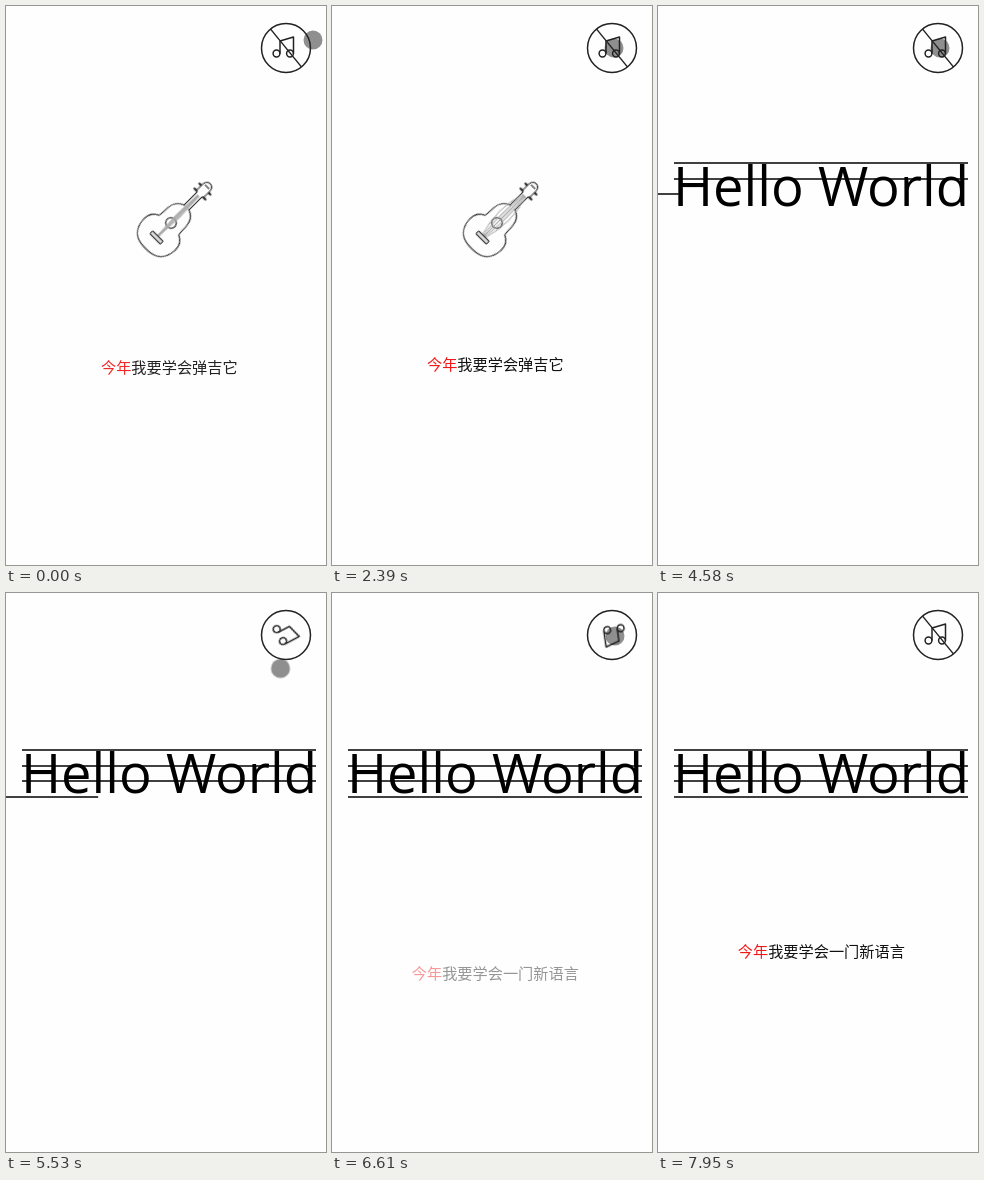
An HTML page that plays this animation: 320x559 px, repeating every 8000 ms.

```html
<!DOCTYPE html>
<html lang="zh-CN">
<head>
<meta charset="utf-8">
<title>今年计划</title>
<style>
  html, body { margin: 0; width: 100%; height: 100%; overflow: hidden; background: #fefefe; }
  svg { display: block; width: 100vw; height: 100vh; }
  svg g, svg path, svg circle, svg text { animation: 8s linear infinite both; }

  .ink { fill: none; stroke: #222; stroke-width: 1.5; stroke-linejoin: round; }
  .guitar { fill: #fefefe; stroke: #333; stroke-width: 1.2; stroke-linejoin: round; }
  .caption {
    font: 15.2px "Noto Sans CJK SC", "Noto Sans CJK JP", sans-serif;
    text-anchor: middle; fill: #111;
  }
  .caption tspan { fill: #f21818; }
  .hello { font: 54.3px "Open Sans", "Noto Sans", sans-serif; fill: #000; }

  .scene1 { animation-name: scene1 !important; }
  .scene2 { animation-name: scene2 !important; }
  .settle { animation-name: settle !important; }
  .rise { animation-name: rise !important; }
  .notes { animation-name: spin !important; transform-origin: 280px 42px; }
  .slash { animation-name: slash !important; }
  .pointer { animation-name: pointer !important; fill: #202020; fill-opacity: .5; }

  .rule {
    stroke: #000; stroke-width: 1.5;
    animation-name: slide !important;
    animation-delay: calc(var(--i) * 850ms) !important;
  }
  .strings {
    fill: none; stroke: #aaa; stroke-width: .9;
    /* 33 plucks per loop */
    animation: pluck calc(8s / 33) 75ms ease-in-out infinite both !important;
  }
  .strings path { vector-effect: non-scaling-stroke; }

  @keyframes scene1 {
    0%, 32.125% { opacity: 1; }
    32.126%, 100% { opacity: 0; }
  }
  @keyframes scene2 {
    0%, 32.125% { opacity: 0; }
    32.126%, 100% { opacity: 1; }
  }
  @keyframes settle {
    0% { transform: translateY(3px); opacity: .93; }
    .94%, 100% { transform: none; opacity: 1; }
  }
  @keyframes rise {
    0%, 76.875% { transform: translateY(40px); opacity: 0; }
    90%, 100% { transform: translateY(0); opacity: 1; }
  }
  @keyframes slide {
    0% { transform: translateX(-400px); }
    32.25% { transform: translateX(-400px); animation-timing-function: cubic-bezier(.37, 0, .63, 1); }
    42.875%, 100% { transform: translateX(0); }
  }
  @keyframes pluck {
    0%, 100% { transform: scaleY(.3); }
    50% { transform: scaleY(1); }
  }
  @keyframes spin {
    0%, 61.5% { transform: rotate(0deg); }
    85% { transform: rotate(191deg); }
    85.001%, 100% { transform: rotate(0deg); }
  }
  @keyframes slash {
    0%, 61.5% { opacity: 1; }
    61.501%, 85% { opacity: 0; }
    85.001%, 100% { opacity: 1; }
  }
  @keyframes pointer {
    0% { transform: translate(307px, 34px); }
    3.125% { transform: translate(304px, 23px); }
    7.5%, 21.875% { transform: translate(283px, 35px); }
    23.75%, 62.5% { transform: translate(282px, 42px); }
    65.625%, 73.75% { transform: translate(274.5px, 75.5px); }
    77.5%, 90% { transform: translate(283px, 43px); }
    93.625% { transform: translate(260px, 123px); }
    97.375% { transform: translate(77px, 485px); opacity: 1; }
    97.376%, 100% { transform: translate(77px, 485px); opacity: 0; }
  }
</style>
</head>
<body>
<svg viewBox="0 0 320 559" preserveAspectRatio="none">
  <g class="scene1">
    <!-- drawn along the neck, sound hole at the origin -->
    <g class="guitar" transform="translate(165 217) rotate(-45)">
      <path d="M41 -7.5V7.5M48 -7.5V7.5" stroke-width="2.4" stroke-linecap="round"/>
      <path d="M21 -3.5H40L42 -5H50Q55.500 -4.500 55.500 0T50 5H42L40 3.500H21Z"/>
      <path d="M22 -3.500C20 -9 15 -12.500 9 -13C3 -13.500 1 -13 -3 -14
               C-6 -21 -12 -22.500 -18 -22C-28 -21 -34 -16 -35.500 -7Q-36.500 0 -35.500 7
               C-34 16 -28 21 -18 22C-12 22.500 -6 21 -3 14C1 13 3 13.500 9 13C15 12.500 20 9 22 3.500Z"/>
      <path d="M6 -2.500H39V2.500H6Z" fill="#e2e2e2" stroke="none"/>
      <circle r="5.300"/>
      <g class="strings">
        <path d="M-19 -2Q10 -11 39 -2"/>
        <path d="M-19 -1Q10 -5 39 -1"/>
        <path d="M-19 0H39"/>
        <path d="M-19 1Q10 5 39 1"/>
        <path d="M-19 2Q10 11 39 2"/>
      </g>
      <rect x="-22.500" y="-7.500" width="4" height="15" rx="1" fill="#ddd"/>
      <path d="M51 -3V3"/>
    </g>
    <text class="caption settle" x="163.300" y="364"><tspan>今年</tspan>我要学会弹吉它</text>
  </g>

  <g class="scene2">
    <text class="hello" x="15" y="199.500">Hello World</text>
    <path class="rule" style="--i:0" d="M16 157H310"/>
    <path class="rule" style="--i:1" d="M16 173H310"/>
    <path class="rule" style="--i:2" d="M16 188H310"/>
    <path class="rule" style="--i:3" d="M16 204H310"/>
    <text class="caption rise" x="163.300" y="364"><tspan>今年</tspan>我要学会一门新语言</text>
  </g>

  <g class="ink">
    <circle cx="280" cy="42" r="24.500"/>
    <path class="slash" d="M264.500 23L295.500 61" stroke-width="1.200"/>
    <g class="notes">
      <circle cx="270.500" cy="47.500" r="3.400"/>
      <circle cx="284" cy="47.500" r="3.400"/>
      <path d="M274 47.500V35L287.500 31V47.500"/>
    </g>
  </g>
  <circle class="pointer" r="9.500"/>
</svg>
</body>
</html>
```
